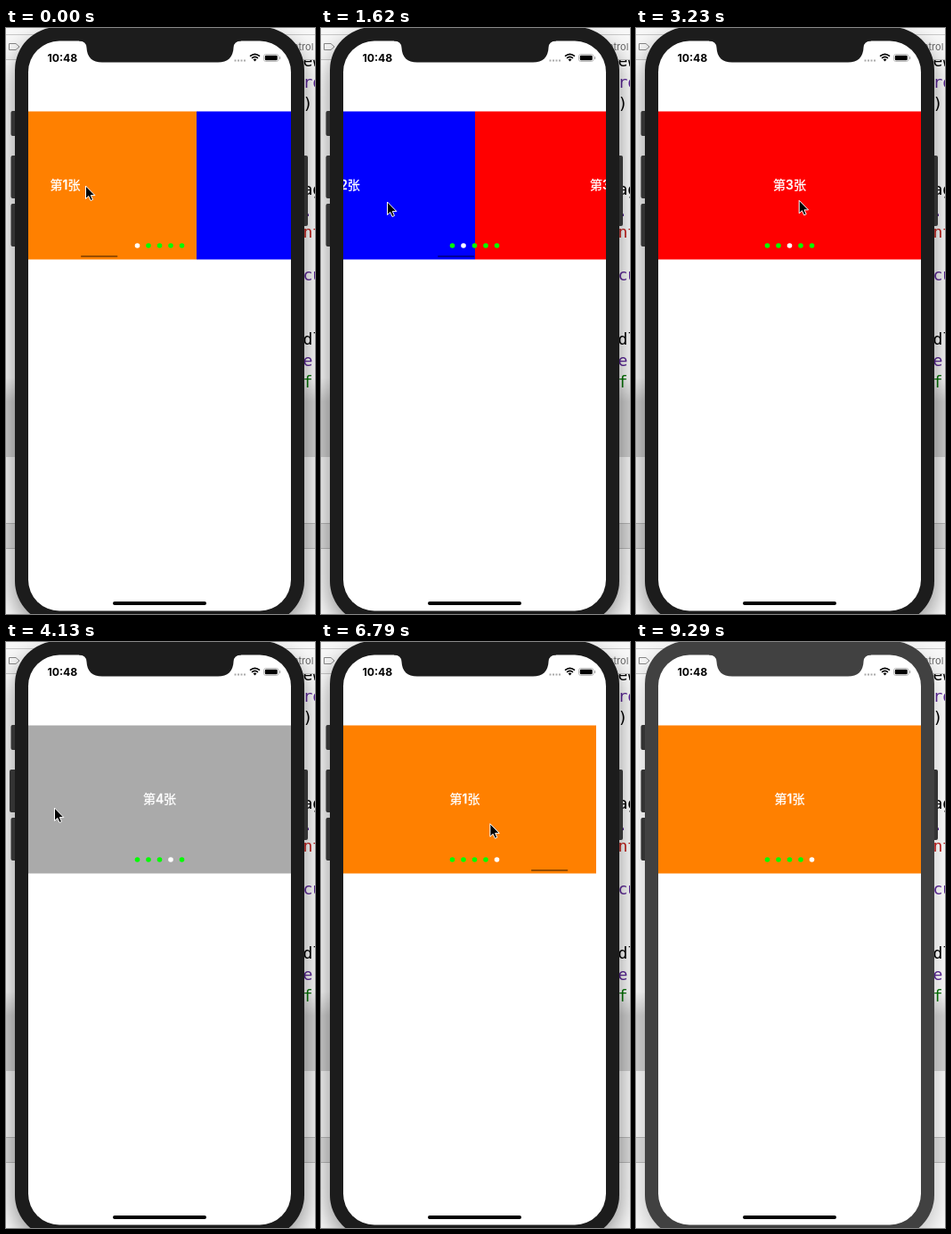
Write an HTML page that moves like this. It is 347 by 657 pixels and loops after 9390 ms.

```html
<!DOCTYPE html>
<html lang="zh">
<head>
<meta charset="utf-8">
<title>Carousel</title>
<style>
html, body { margin: 0; width: 100%; height: 100%; overflow: hidden; background: #fff; }
svg { display: block; width: 347px; height: 657px; }
.code { font: 18px "DejaVu Sans Mono", monospace; }
.slide {
  font: 500 14px Inter, "Noto Sans CJK SC", "Noto Sans CJK", sans-serif;
  fill: #fff; stroke: #fff; stroke-width: .3; text-anchor: middle;
}
.clock { font: 700 12.2px Inter, sans-serif; }
.tab { font: 11px Inter, sans-serif; fill: #666; }
#shadow { filter: blur(13px); }
</style>
</head>
<body>
<svg viewBox="0 0 347 657">
  <defs>
    <clipPath id="screen"><rect x="25" y="14.500" width="295" height="639" rx="35"/></clipPath>
    <linearGradient id="editor" x1="0" y1="0" x2="0" y2="1">
      <stop offset=".8" stop-color="#fff"/>
      <stop offset=".86" stop-color="#d2d2d2"/>
    </linearGradient>
  </defs>

  <!-- editor window behind the phone -->
  <rect width="347" height="657" fill="#fafafa"/>
  <rect y="36" width="347" height="445" fill="url(#editor)"/>
  <rect y="555" width="347" height="29" fill="#e2e2e2"/>
  <path d="M0 555.5H347M0 583.5H347" stroke="#bbb"/>
  <g id="code" class="code"></g>
  <rect width="347" height="36" fill="#f7f7f7"/>
  <path d="M0 7.5H347M0 35.5H347" stroke="#c8c8c8"/>
  <path d="M3.500 17.500H11L15 21 11 24.500H3.500Z" fill="none" stroke="#888"/>
  <text class="tab" x="322" y="25">ntrol</text>

  <!-- phone -->
  <rect id="shadow" x="8" y="12" width="329" height="665" rx="50"/>
  <g fill="#333">
    <rect x="5.500" y="93" width="8" height="28" rx="2"/>
    <rect id="volume" y="143" width="9" height="48" rx="2"/>
    <rect x="5.500" y="197" width="8" height="48" rx="2"/>
    <rect x="330" y="143" width="9" height="79" rx="2"/>
  </g>
  <g id="frame">
    <rect x="10" y="-1" width="325" height="669" rx="48"/>
    <rect x="25" y="14.500" width="295" height="639" rx="35" fill="#fff"/>
    <path d="M82 13V14.500Q90 14.500 90.500 22C91 33 97 38.500 108 38.500H238C249 38.500 255 33 255.500 22Q256 14.500 264 14.500V13Z"/>
  </g>
  <text class="clock" x="46.500" y="37.500">10:48</text>
  <path d="M256.500 36.500H270" stroke="#aaa" stroke-width="2" stroke-dasharray="2 1.500"/>
  <path d="M274 31.700Q279.500 27 285 31.700M276 33.900Q279.500 31 283 33.900" fill="none" stroke="#000" stroke-width="1.600"/>
  <path d="M277.500 35.300Q279.500 33.800 281.500 35.300L279.500 37.500Z"/>
  <rect x="289.500" y="29.500" width="16.500" height="8" rx="2.300" fill="none" stroke="#aaa" stroke-width=".8"/>
  <rect x="290.800" y="30.800" width="13.900" height="5.400" rx="1.200"/>
  <rect x="307" y="32" width="1.200" height="3" rx=".6" fill="#aaa"/>

  <g clip-path="url(#screen)">
    <g id="strip"></g>
    <rect id="indicator" y="255" width="41.500" height="1.900" rx=".95"/>
    <g id="dots"></g>
  </g>
  <rect x="120" y="643" width="105" height="4" rx="2"/>
  <path id="cursor" d="M0 0V14.500L3.300 11.500 5.500 16.500 8 15.400 5.800 10.600H10.400Z" stroke="#fff"/>
</svg>
<script>
const LOOP = 9390, STEP = 147.5, PAGE = 295, LEFT = 25;
const $ = id => document.getElementById(id);

function add(parent, tag, attrs, text = "") {
  const node = document.createElementNS("http://www.w3.org/2000/svg", tag);
  for (const name in attrs) node.setAttribute(name, attrs[name]);
  node.textContent = text;
  return parent.appendChild(node);
}

const codeColors = { ro: "#5c2699", ".r": "#5c2699", cu: "#5c2699", "e:": "#5c2699", nt: "#c41a16", f: "#007400" };
"ew|ro|)||||ag|.r|nt||cu|||dl|e:|f".split("|").forEach((text, i) =>
  add($("code"), "text", { x: 333.5, y: 43 + 24 * i, fill: codeColors[text] || "#000" }, text));

["#ff8000", "#00f", "#f00", "#aaa", "#ff8000"].forEach((fill, i) => {
  const x = LEFT + i * PAGE;
  add($("strip"), "rect", { x, y: 93.5, width: PAGE, height: 166, fill });
  add($("strip"), "text", { class: "slide", x: x + PAGE / 2, y: 181 }, `第${i % 4 + 1}张`);
});
const dots = Array.from({ length: 5 }, (_, i) =>
  add($("dots"), "circle", { cx: 147.5 + 12.5 * i, cy: 244, r: 2.8 }));

// Drags of the carousel: the second page turn pauses halfway, the last drag bounces back
const drags = [
  { start: -252, time: 620, pages: 1 },
  { start: 1200, time: 420, pages: 0.5 },
  { start: 2118, time: 490, pages: 0.5 },
  { start: 3300, time: 500, pages: 1 },
  { start: 5500, time: 600, pages: 1 },
  { start: 6700, time: 250, pages: 0.15 },
  { start: 6950, time: 270, pages: -0.15 }
];

// Turning points of the hand: time, x, y
const hand = [
  [0, 89.5, 177], [350, 48, 184], [1180, 223, 194], [1620, 74.5, 195], [2500, 68.5, 195],
  [3300, 205, 193], [3690, 4, 190], [4130, 54.5, 186], [5450, 79.5, 188], [5600, 180, 190],
  [6050, 41, 190], [6700, 205, 203], [7050, 103, 208], [7520, 143, 210], [7700, 143, 210],
  [8410, 268, 638]
];

const clamp = v => Math.min(1, Math.max(0, v));
const ease = v => { const u = clamp(v); return u * u * (3 - 2 * u); };

function handAt(t) {
  let [, x, y] = hand[0];
  for (let i = 1; i < hand.length; i++) {
    const [from, x0, y0] = hand[i - 1], [to, x1, y1] = hand[i];
    const u = ease((t - from) / (to - from));
    x += (x1 - x0) * u;
    y += (y1 - y0) * u;
  }
  return [x, y];
}

function draw(now) {
  const t = Math.floor((now % LOOP) / STEP + 0.05) * STEP;
  let offset = 0, glow = 0;
  for (const { start, time, pages } of drags) {
    offset += PAGE * pages * ease((t - start) / time);
    if (t >= start) glow = Math.max(glow, clamp(1 - (t - start - time) / 300));
  }
  const page = Math.min(4, Math.ceil(offset / PAGE - 0.5));
  const inactive = t > 9280;
  const pressed = t > 3670 && t < 4800;

  $("strip").setAttribute("transform", `translate(${-Math.floor(offset + 0.01)} 0)`);
  $("indicator").setAttribute("x", 69 + offset * 0.14);
  $("indicator").setAttribute("opacity", glow * 0.4);
  dots.forEach((dot, i) => dot.setAttribute("fill", i === page ? "#fff" : "#0f0"));
  $("cursor").setAttribute("transform", `translate(${handAt(t)})`);
  $("cursor").setAttribute("visibility", t < 8500 ? "visible" : "hidden");
  $("volume").setAttribute("x", pressed ? 4 : 5.5);
  $("frame").setAttribute("fill", inactive ? "#414141" : "#1c1c1c");
  $("shadow").setAttribute("opacity", inactive ? 0.22 : 0.42);
}

const start = performance.now();
function tick() {
  draw(performance.now() - start);
  requestAnimationFrame(tick);
}
tick();
</script>
</body>
</html>
```
